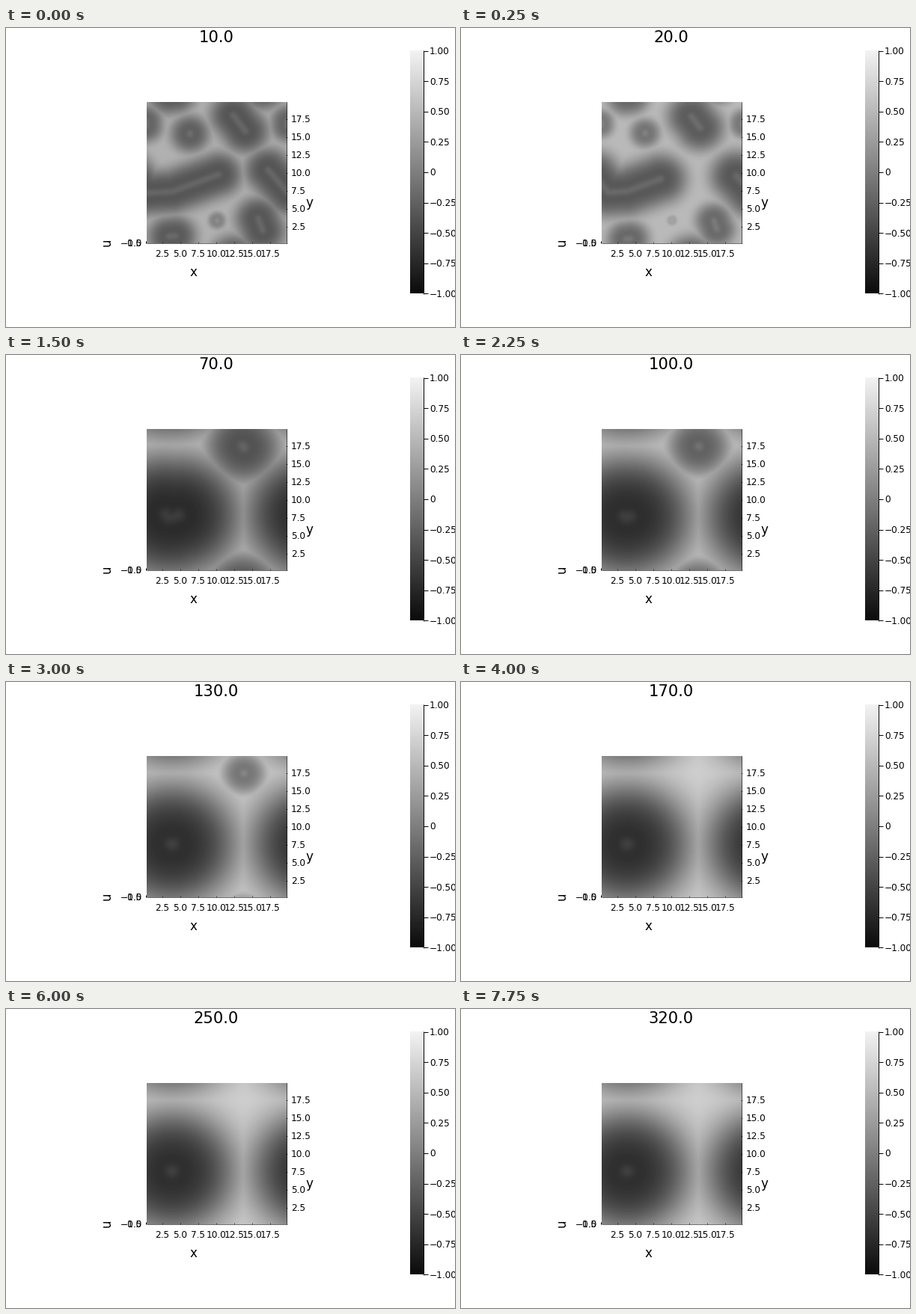
Write a matplotlib script that moves like this. It is 600 px wide and 400 px high and loops after 8 s.

```python
import numpy as np
import matplotlib.pyplot as plt
from matplotlib.animation import FuncAnimation

W, H, DPI = 600, 400, 100
FRAMES, INTERVAL = 32, 250
LEFT, RIGHT, TOP, BOTTOM = 188, 376, 99, 288
PERIOD = 190.4
GRID = 100
SOFT = 2.0
TICK, GUIDE, TITLE = 12.1, 16.7, 21.2

plt.rcParams["font.family"] = "DejaVu Sans"

# Cells of the periodic pattern: core line at the start, point it contracts to,
# first size, growth, and the frame at which the cell has collapsed.
CELLS = [
    ([(160, 190), (187, 221), (222, 219), (284, 196)], (222, 217), 35, 60, np.inf),
    ([(304, 117), (320, 138)], (318, 122), 35, 38, 15),
    ([(218, 279), (226, 278)], (227, 292), 32, 0, 5),
    ([(337, 255), (343, 271)], (340, 265), 34, 0, 3),
    ([(246, 141), (246, 142)], (246, 138), 29, 0, 2.5),
    ([(377, 125), (377, 131)], (377, 128), 26, 0, 2.5),
    ([(282, 257), (282, 258)], (282, 257), 13, 0, 1.5),
]

X, Y = np.meshgrid(LEFT + (RIGHT - LEFT) * (np.arange(GRID) + 0.5) / GRID,
                   TOP + (BOTTOM - TOP) * (np.arange(GRID) + 0.5) / GRID)


def core_distance(points, dx, dy):
    """Distance to a polyline shifted by (dx, dy)."""
    best = np.full(X.shape, np.inf)
    for (ax_, ay_), (bx, by) in zip(points, points[1:]):
        vx, vy = bx - ax_, by - ay_
        px, py = X - ax_ - dx, Y - ay_ - dy
        k = np.clip((px * vx + py * vy) / (vx * vx + vy * vy + 1e-9), 0, 1)
        best = np.minimum(best, (px - k * vx) ** 2 + (1.05 * (py - k * vy)) ** 2)
    return np.sqrt(best)


def bowl(r, size, ceiling):
    """Grey around a core: a dark bowl with a faint crest in the middle."""
    depth = 18 * np.sqrt(size)
    rise = 1 / (1 + np.exp((0.82 * size - r) / (0.2 * size)))
    crest = 22 * np.exp(-((r / (2 + 0.05 * size)) ** 2) / 2)
    return ceiling - depth * (1 - rise) + crest


def field(n):
    """Soft minimum of all cells and their periodic images."""
    ceiling = 215 - 30 * np.exp(-n / 3)
    ease = np.sin(np.pi / 2 * min(n / 6, 1)) ** 2
    stretch = np.exp(-n / 3)
    total = np.full(X.shape, np.exp(-ceiling / SOFT))
    for start, end, first, growth, life in CELLS:
        size = (first + growth * ease) * np.sqrt(max(0, 1 - n / life))
        if size < 2:
            continue
        points = np.array(end) + stretch * (np.array(start) - end)
        for i in (-1, 0, 1):
            for j in (-1, 0, 1):
                r = core_distance(points, i * PERIOD, j * PERIOD)
                total += np.exp(-bowl(r, size, ceiling) / SOFT)
    return -SOFT * np.log(total)


fields = [field(n) for n in range(FRAMES)]

fig = plt.figure(figsize=(W / DPI, H / DPI), dpi=DPI, facecolor="white")
ax = fig.add_axes([0, 0, 1, 1])
ax.axis("off")


def label(x, y, text, px, **kw):
    kw = {"ha": "center", "va": "baseline", **kw}
    return ax.text(x, y, text.replace("-", "\u2212"), fontsize=px * 72 / DPI,
                   color="black", **kw)


def line(xs, ys, lw=0.7):
    ax.plot(xs, ys, color="black", lw=lw, solid_capstyle="butt")


def grey_image(data, extent, mode):
    return ax.imshow(data, cmap="gray", vmin=0, vmax=255, extent=extent,
                     interpolation=mode, aspect="auto")


surface = grey_image(fields[0], (LEFT, RIGHT, BOTTOM, TOP), "bicubic")
grey_image(np.linspace(242, 11, 256)[:, None], (540, 558, 355, 30), "bilinear")
ax.set_xlim(0, W)
ax.set_ylim(H, 0)

# plot axes
line([LEFT, RIGHT], [BOTTOM, BOTTOM], 0.4)
line([RIGHT - 0.6, RIGHT - 0.6], [TOP, BOTTOM], 0.4)
line([187, 187], [284.5, 288])
for i in range(7):
    text = f"{2.5 * (i + 1):.1f}"
    x, y = 209 + 24 * i, 265.8 - 24 * i
    line([x, x], [BOTTOM - 2, BOTTOM], 0.4)
    line([RIGHT - 2, RIGHT], [y, y], 0.4)
    label(x - 0.2, 305.5, text, TICK)
    label(380.7, y + 4.5, text, TICK, ha="left")
for text in ("-1.0", "-0.5"):
    label(181.5, 292, text, TICK, ha="right")
label(250.3, 331.8, "x", GUIDE)
label(405.5, 238.8, "y", GUIDE)
label(135, 287, "u", GUIDE, va="center", rotation=90)

# colour bar axis
line([558, 558], [30, 355.5])
for i in range(9):
    value = 1 - i / 4
    y = 30.5 + 40.6 * i
    line([558, 564], [y, y])
    label(566, y + 4.5, f"{value:.2f}" if value else "0", TICK, ha="left")

title = label(281, 18.6, "", TITLE)


def draw(n):
    surface.set_data(fields[n])
    title.set_text(f"{10 * (n + 1):.1f}")
    return surface, title


anim = FuncAnimation(fig, draw, frames=FRAMES, interval=INTERVAL,
                     repeat=True, repeat_delay=0, blit=False)
plt.show()
```
